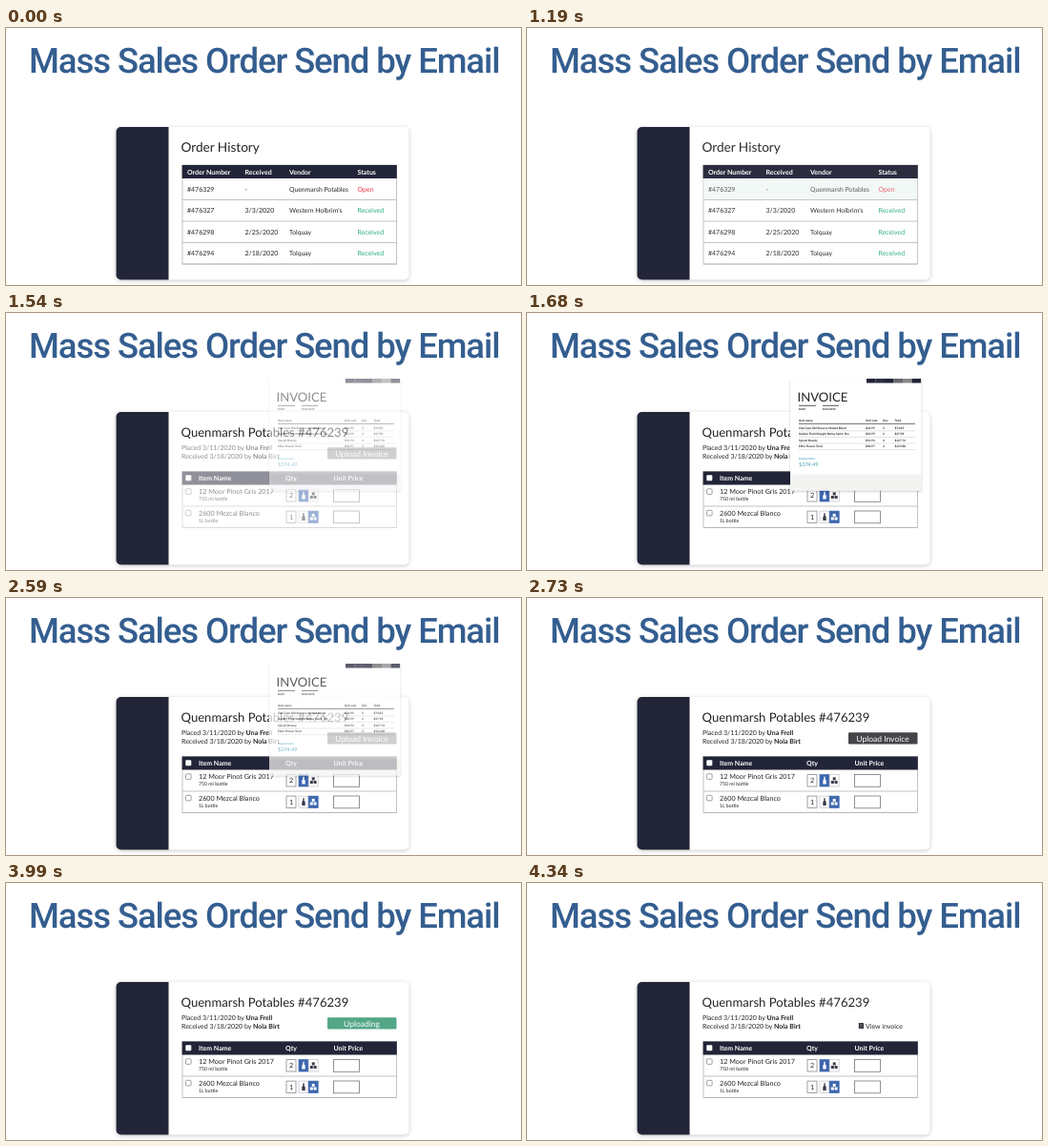
These frames come from a looping animation (540 px wide and 270 px high, 6020 ms). An HTML page:

```html
<!DOCTYPE html>
<html lang="en">
<head>
<meta charset="utf-8">
<title>Mass Sales Order Send by Email</title>
<style>
  html, body { margin: 0; width: 100%; height: 100%; overflow: hidden; background: #fff; }
  svg { display: block; width: 100%; height: 100%; }
  text { font-family: Lato, "Open Sans", sans-serif; text-rendering: geometricPrecision; white-space: pre; }
  .headline { font: 500 36.5px Roboto, sans-serif; letter-spacing: -1.11px; }
  .card { filter: drop-shadow(0 1px 2px rgba(0, 0, 0, .22)); }
  .sheet { filter: drop-shadow(0 1px 1px rgba(0, 0, 0, .2)); }
</style>
</head>
<body>
<svg id="stage" viewBox="0 0 540 270"></svg>
<script>
const LOOP = 6020, TICK = 70;
const NAVY = '#222437', INK = '#242428', GREEN = '#2bab7c', BLUE = '#3c66ae', RULE = '#b4b4b8';
const BUYER = 'Quenmarsh Potables';
const stage = document.getElementById('stage');

function add(parent, tag, attrs = {}) {
  const el = document.createElementNS('http://www.w3.org/2000/svg', tag);
  for (const key in attrs) el.setAttribute(key, attrs[key]);
  parent.append(el);
  return el;
}
const group = (parent, attrs) => add(parent, 'g', attrs);
const rect = (parent, x, y, width, height, fill, more = {}) =>
  add(parent, 'rect', { x, y, width, height, fill, ...more });
const line = (parent, x1, x2, y, stroke = RULE, width = 0.8) =>
  add(parent, 'path', { d: `M${x1} ${y}H${x2}`, stroke, 'stroke-width': width });
function text(parent, x, y, str, size = 7, fill = INK, more = {}) {
  const el = add(parent, 'text', { x, y, 'font-size': size, fill, ...more });
  el.textContent = str;
  return el;
}
const bold = (parent, x, y, str, size = 7, fill = INK) =>
  text(parent, x, y, str, size, fill, { 'font-weight': 700 });
const outline = (parent, x, y, w, h, stroke = '#8a8a90') =>
  rect(parent, x, y, w, h, '#fff', { stroke, 'stroke-width': 0.8 });

// Fixed parts
text(stage, 24, 47, 'Mass Sales Order Send by Email', 36.5, '#345e90', { class: 'headline' });
const card = group(stage, { class: 'card' });
rect(card, 115.5, 104, 307, 160.5, '#fff', { rx: 5 });
add(card, 'path', { d: 'M170.500 104H120.500a5 5 0 0 0-5 5v150.500a5 5 0 0 0 5 5H170.500z', fill: NAVY });

function tableFrame(parent, top, rows, heads) {
  const bottom = top + 14 + rows * 22.5;
  outline(parent, 185, top, 224.5, bottom - top, RULE);
  rect(parent, 184.6, top, 225.2, 14, NAVY);
  for (const [x, label] of heads) bold(parent, x, top + 9.7, label, 7, '#fff');
  for (let i = 1; i <= rows; i++) line(parent, 185, 409.5, top + 14 + i * 22.5);
}

// Order list
const list = group(stage);
text(list, 183.5, 130, 'Order History', 13.6);
tableFrame(list, 144, 4, [[190, 'Order Number'], [250.5, 'Received'], [297, 'Vendor'], [368.5, 'Status']]);
const hover = rect(list, 185.5, 158.2, 223.6, 21.8, '#f1f8f6');
const orders = [
  ['#476329', '-', BUYER, 'Open'],
  ['#476327', '3/3/2020', "Western Holbrim's", 'Received'],
  ['#476298', '2/25/2020', 'Tolquay', 'Received'],
  ['#476294', '2/18/2020', 'Tolquay', 'Received']
];
const orderRows = orders.map(([id, date, vendor, status], i) => {
  const row = group(list), y = 171.7 + i * 22.5;
  text(row, 190, y, id);
  text(row, 250.5, y, date);
  text(row, 297, y, vendor, 6.8);
  text(row, 368.5, y, status, 7, status === 'Open' ? '#ee3340' : GREEN);
  return row;
});

// Order detail
const heading = text(stage, 183.5, 130, BUYER + ' #476239', 13.1);
const detail = group(stage);
[['Placed 3/11/2020 by ', 'Una Frell', 144.3], ['Received 3/18/2020 by ', 'Nola Birt', 152.8]]
  .forEach(([lead, who, y]) => {
    const el = text(detail, 184, y, lead);
    add(el, 'tspan', { 'font-weight': 700 }).textContent = who;
  });
tableFrame(detail, 166.5, 2, [[202, 'Item Name'], [293, 'Qty'], [343.5, 'Unit Price']]);
rect(detail, 188.3, 170.3, 6, 6, '#fff', { rx: 1 });

function bottle(parent, x, y, fill) {
  add(parent, 'path', { d: `M${x - 0.7} ${y - 4}h1.4v2.6l1 1.4v3.8h-3.4v-3.8l1-1.4z`, fill });
}
function crates(parent, x, y, fill) {
  for (const [dx, dy] of [[-1.5, -3.4], [-3.4, 0.2], [0.4, 0.2]]) rect(parent, x + dx, y + dy, 3, 3, fill);
}
const items = [
  ['12 Moor Pinot Gris 2017', '750 ml bottle', '2', true],
  ['2600 Mezcal Blanco', '1L bottle', '1', false]
];
items.forEach(([name, pack, qty, single], i) => {
  const y = 180.8 + i * 22.5, mid = y + 11;
  outline(detail, 188.5, y + 4, 5.6, 5.6).setAttribute('rx', 1);
  text(detail, 202, y + 9.2, name, 7.2);
  text(detail, 202, y + 16.6, pack, 5.2);
  outline(detail, 294, y + 4.8, 10, 12.4);
  text(detail, 299, y + 13.5, qty, 7.2, INK, { 'text-anchor': 'middle' });
  [[307, bottle, single], [317.2, crates, !single]].forEach(([x, icon, on]) => {
    rect(detail, x, y + 4.8, 10, 12.4, on ? BLUE : '#fff', { stroke: on ? BLUE : '#c4c4ca', 'stroke-width': 0.7 });
    icon(detail, x + 5, mid, on ? '#fff' : '#3a3b4a');
  });
  outline(detail, 343.5, y + 4.7, 27, 12.8, '#77777c');
});

const button = group(detail);
const face = rect(button, 337, 141.2, 72.5, 12.2, '#444', { rx: 1.2 });
const label = text(button, 373, 150.5, '', 8.5, '#fff', { 'text-anchor': 'middle' });
const view = group(detail);
rect(view, 347.8, 147, 5.2, 6, '#33343c', { rx: 0.5 });
for (const y of [148.7, 150, 151.3]) line(view, 349, 352, y, '#999', 0.4);
text(view, 355, 152.6, 'View invoice');

// Invoice sheet
const sheet = group(stage, { class: 'sheet' });
rect(sheet, 276, 69, 137.5, 117.5, '#fff');
rect(sheet, 276, 169.5, 137.5, 17, '#f3f3f2');
[NAVY, '#2c2d42', NAVY, '#66666c', '#88888c', NAVY]
  .forEach((fill, i) => rect(sheet, 356 + i * 9.5, 69, 9.6, 4.5, fill));
text(sheet, 283.5, 93.2, 'INVOICE', 13.1);
line(sheet, 285, 303, 97.3, '#44444a', 0.9);
line(sheet, 310, 327, 97.3, '#44444a', 0.9);
bold(sheet, 285, 102, 'DATE', 2.8);
bold(sheet, 310, 102, 'DUE DATE', 2.8);
const columns = [285, 355, 373, 385.5];
['Item name', 'Unit cost', 'Qty', 'Total'].forEach((s, i) => bold(sheet, columns[i], 114.3, s, 3.1));
line(sheet, 285, 407, 116.4, '#33343c', 0.7);
const bill = [
  ['Oak Cask Old Reserve Malted Blend', '$24.95', '3', '$74.85'],
  ['Golden Field Straight Barley Spirit, Dry', '$23.99', '2', '$47.98'],
  ['Spiced Brandy', '$31.94', '4', '$127.76'],
  ['Elder Flower Tonic', '$30.97', '4', '$123.88']
];
bill.forEach((cells, i) => {
  const y = 121.6 + i * 6.6;
  cells.forEach((s, k) => bold(sheet, columns[k], y, s, 3.1));
  line(sheet, 285, 407, y + 2.2, '#b8b8bc', 0.4);
});
bold(sheet, 285, 154.3, 'Invoice total', 3, '#4a9fba');
text(sheet, 285, 161, '$374.49', 5.5, '#4a9fba');

// Timing
const clamp = v => Math.min(1, Math.max(0, v));
function ease(t, from, to) {
  const p = clamp((t - from) / (to - from));
  return p * p * (3 - 2 * p);
}
const tones = [[3220, 68, 69, 73], [3570, 107, 151, 132], [4060, 79, 170, 135]];
function tone(t) {
  const [a, b] = t < tones[1][0] ? tones : tones.slice(1);
  const p = clamp((t - a[0]) / (b[0] - a[0]));
  return `rgb(${[1, 2, 3].map(i => Math.round(a[i] + (b[i] - a[i]) * p))})`;
}
const fade = (el, v) => { el.style.opacity = v; };

function draw(now) {
  const t = Math.floor((now % LOOP) / TICK) * TICK;
  const lit = ease(t, 700, 910);
  const done = ease(t, 4130, 4340);
  fade(hover, lit);
  fade(orderRows[0], 1 - 0.22 * lit);
  fade(list, 1 - ease(t, 1170, 1330));
  fade(heading, ease(t, 1190, 1330));
  fade(detail, ease(t, 1400, 1680));
  fade(sheet, ease(t, 1400, 1680) * (1 - ease(t, 2520, 2730)));
  label.textContent = t < 3150 ? 'Upload Invoice' : 'Uploading';
  face.setAttribute('fill', tone(t));
  fade(button, 1 - done);
  fade(view, done);
}

const start = performance.now();
function frame() {
  draw(performance.now() - start);
  requestAnimationFrame(frame);
}
frame();
</script>
</body>
</html>
```
